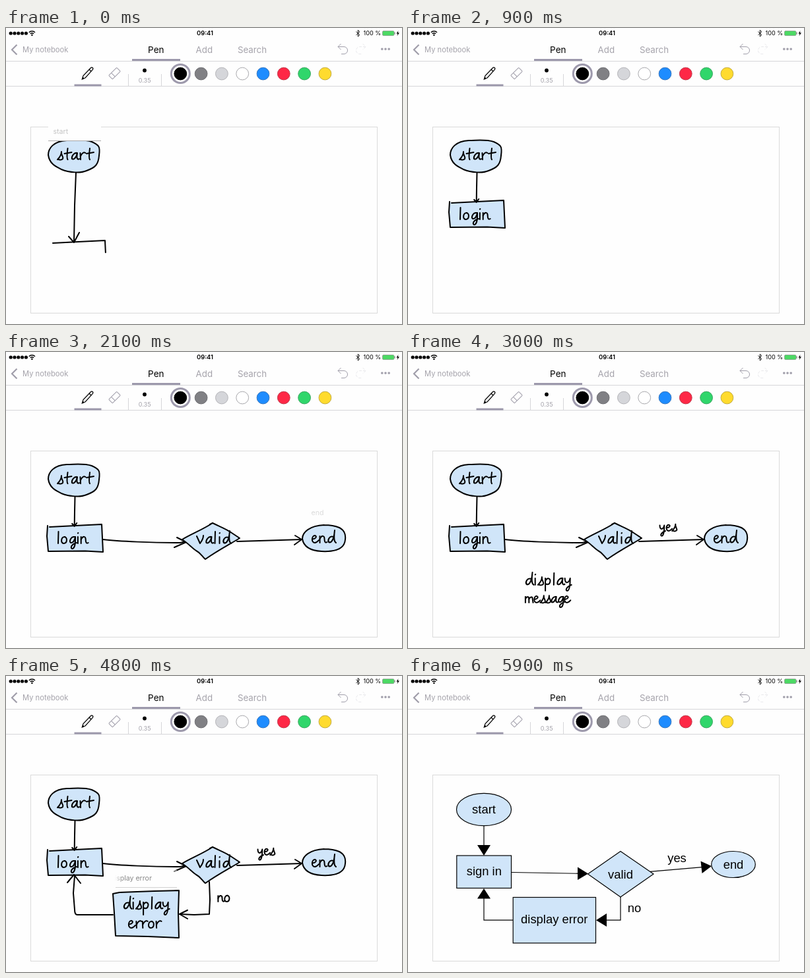
Write an HTML page that moves like this. It is 600x450 px and loops after 6.9 s.

```html
<!DOCTYPE html>
<html lang="en">
<head>
<meta charset="utf-8">
<title>Flowchart sketch</title>
<style>
html, body { margin: 0; width: 100%; height: 100%; overflow: hidden; background: #fefefe; }
svg { display: block; width: 600px; height: 450px; }
.ui { font-family: Inter, Roboto, sans-serif; fill: #a5a3ab; }
.type { font: 18.4px "Liberation Sans", Arial, sans-serif; fill: #000; stroke: none; }
.mid { text-anchor: middle; }
.ink { fill: none; stroke: #000; stroke-width: 2; stroke-linecap: round; stroke-linejoin: round; }
.line { fill: none; stroke: #a09eaa; stroke-width: 1; }
</style>
</head>
<body>
<svg viewBox="0 0 600 450">
  <defs>
    <linearGradient id="edge" gradientUnits="userSpaceOnUse" x1="165" y1="0" x2="176" y2="0">
      <stop stop-color="#000"/><stop offset="1" stop-color="#fff"/>
    </linearGradient>
    <mask id="fade" maskUnits="userSpaceOnUse" x="0" y="0" width="600" height="450">
      <rect width="600" height="450" fill="url(#edge)"/>
    </mask>
  </defs>
  <rect width="600" height="450" fill="#fefefe"/>

  <g class="ui">
    <g id="signal" fill="#000"></g>
    <g fill="none" stroke="#000" stroke-width="1.3">
      <path d="M34.8 6.8a6.2 6.2 0 0 1 9.2 0M36.7 8.9a3.8 3.8 0 0 1 5.4 0"/>
      <path d="M530.5 5.5l5.5 5-2.7 2.5V3.2l2.7 2.5-5.5 5" stroke-width=".9"/>
    </g>
    <circle cx="39.4" cy="10.7" r="1.2" fill="#000"/>
    <text class="mid" x="301.5" y="11.3" font-size="9.4" font-weight="600" fill="#000">09:41</text>
    <text x="541.5" y="11.3" font-size="9.1" fill="#000">100 %</text>
    <rect x="570.5" y="4.5" width="17.5" height="7" rx="1.5" fill="#4cd964" stroke="#8c9a8e" stroke-width=".8"/>
    <path d="M589 6.5v3" stroke="#777" stroke-width="1.2"/>
    <path d="M594.5 4l-3 4.5h2l-.8 3.5 3.3-4.8h-2.2z" fill="#000"/>

    <path class="line" d="M16.5 25.5L9 33l7.5 7.5" stroke-width="2" style="stroke-width:2.2"/>
    <text x="25" y="37" font-size="11.2">My notebook</text>
    <text class="mid" x="227.3" y="38" font-size="13.5" fill="#000">Pen</text>
    <text class="mid" x="300.3" y="38" font-size="13.3">Add</text>
    <text class="mid" x="373" y="38" font-size="13.3">Search</text>
    <path d="M0 50.5H600M0 88.5H600M185.5 70V88M235.5 70V88" stroke="#d6d6d9"/>
    <path d="M191 48.5H264M103.5 87H144.500" stroke="#9d99ac" stroke-width="3"/>
    <path class="line" d="M507.500 24l-4.500 4.500 4.500 4.500M503 28.500h9a5.500 5.500 0 0 1 0 11h-4"/>
    <path class="line" d="M540.500 24l4.500 4.500-4.500 4.500M545 28.500h-9a5.500 5.500 0 0 0 0 11h4" style="stroke:#e9e9ec" stroke-dasharray="4 2"/>
    <g fill="#a09eaa"><circle cx="569.8" cy="32" r="1.8"/><circle cx="575" cy="32" r="1.8"/><circle cx="580.2" cy="32" r="1.8"/></g>

    <path d="M115.300 78l1.700-5.500 11-11.500q2-1.800 3.300-.5t-.3 3.200l-10.800 12zM126 63l3.200 3" fill="none" stroke="#000" stroke-width="1.200"/>
    <path d="M115 78.300l1.300-4 2.500 2.400z" fill="#000"/>
    <g class="line" transform="translate(164.500 69) rotate(-45)">
      <rect x="-8.500" y="-4" width="17" height="8" rx="1"/><path d="M-3 -4v8"/>
    </g>
    <circle cx="210" cy="64.500" r="2.900" fill="#000"/>
    <text class="mid" x="210.200" y="83.300" font-size="9.100">0.35</text>
    <circle cx="264.300" cy="69.500" r="14" fill="#fff" stroke="#9d99ac" stroke-width="3"/>
    <g id="swatches"></g>
  </g>

  <rect x="37.500" y="150.500" width="525" height="283" fill="none" stroke="#dadada"/>
  <g id="hand"></g>
  <g id="labels" class="ui"></g>

  <g id="clean" stroke="#000" stroke-width="1.200">
    <g fill="#d0e5f9">
      <ellipse cx="115" cy="203" rx="41.500" ry="24.600"/>
      <rect x="73.800" y="273" width="82.700" height="49.500"/>
      <path d="M322 266.500L372 301 322 336 272.500 301z"/>
      <ellipse cx="493" cy="286.500" rx="33.300" ry="20"/>
      <rect x="159.200" y="336.500" width="125.300" height="69.500"/>
    </g>
    <path d="M115 228V260M156.500 298.500L260 300.300M367 297.300L448 290.300M322 336V371.200H298M159 371.200H115V335" fill="none"/>
    <path d="M105 257h20l-10 16zM257 290.500v19.500l16-9.500zM443.500 281.500l2 18.500 14.500-11zM301 361v20l-16-9.800zM105 338.500h20l-10-15.500z" stroke="none"/>
    <g class="type mid">
      <text x="115" y="209">start</text><text x="115.300" y="302.500">sign in</text>
      <text x="322" y="308">valid</text><text x="493" y="293">end</text>
      <text x="407.500" y="283">yes</text><text x="343" y="358.500">no</text>
      <text x="221.700" y="376">display error</text>
    </g>
  </g>
</svg>
<script>
const LOOP = 6900, STEP = 100, LAST = 5900, CONVERT = 5700;
const byId = id => document.getElementById(id);
const clamp = v => Math.max(0, Math.min(1, v));
const hand = byId('hand');

function add(parent, tag, attrs) {
  const el = document.createElementNS('http://www.w3.org/2000/svg', tag);
  for (const k in attrs) el.setAttribute(k, attrs[k]);
  return parent.appendChild(el);
}
const show = (el, on) => { el.style.display = on ? '' : 'none'; };

for (let i = 0; i < 5; i++) add(byId('signal'), 'circle', { cx: 7.2 + i * 5.8, cy: 8, r: 2.6 });
[['#000', '#000'], ['#808084', '#707074'], ['#d5d6da', '#b4b4b8'], ['#fff', '#a8a8ac'],
 ['#1e8cff', '#3b78bd'], ['#fe2846', '#c03a4c'], ['#30d66b', '#3ea562'], ['#ffdb2e', '#c2ab42']]
  .forEach(([fill, stroke], i) =>
    add(byId('swatches'), 'circle', { cx: 264.3 + i * 31.3, cy: 69.5, r: 9.4, fill, stroke }));

// Letters as pen strokes on a baseline at 0: [advance, path]
const GLYPHS = {
  a: [11, 'M9 -10C4 -11 0 -5 1 -1C4 1 8 -4 9 -10C8 -4 8 1 12 -1'],
  d: [12, 'M9 -9C3 -11 0 -4 2 -1C6 1 10 -5 11 -19C10 -11 9 -2 13 0'],
  e: [11, 'M1 -6C6 -5 9 -10 5 -11C0 -11 -1 0 5 0C8 0 10 -3 11 -4'],
  g: [11, 'M9 -10C3 -11 0 -2 3 -1C7 0 9 -6 10 -10C10 -2 10 8 5 8C2 7 4 1 12 -1'],
  i: [5, 'M2 -10L2 0M2 -15.5L2.5 -16'],
  l: [5, 'M2 -18L1.5 0'],
  m: [15, 'M1 -10L1 0M1 -6C3 -11 7 -11 7 -6L7 0M7 -6C10 -11 13 -10 13 -6L14 0'],
  n: [12, 'M1 -10L1 0M1 -6C4 -12 8 -11 8 -6C8 -2 9 1 12 -1'],
  o: [11, 'M6 -10C0 -11 -1 0 4 0C10 0 10 -10 5 -10'],
  p: [11, 'M1 -10L1 9M1 -6C4 -12 10 -10 8 -4C7 0 3 0 1 -2'],
  r: [9, 'M1 -10L1.5 0M1.5 -5C3 -9 6 -12 9 -10'],
  s: [9, 'M0 0C4 -4 6 -8 6 -12C5 -6 10 -4 8 -1C6 1 2 1 1 -1'],
  t: [9, 'M5 -17C4 -9 3 -2 5 0M0 -9L11 -11'],
  v: [12, 'M0 -11L5 0C8 -4 10 -8 10 -12'],
  y: [11, 'M0 -10C0 -1 6 -2 8 -10C8 -1 7 8 4 9C0 9 2 3 10 0'],
  ' ': [6, '']
};

const strokes = [], fills = [], labels = [];

// Spreads the time from..to over all pen strokes by their length
function schedule(paths, from, to, until = Infinity) {
  const lens = paths.map(p => p.getTotalLength());
  const rate = (to - from) / lens.reduce((a, b) => a + b, 0);
  let start = from;
  paths.forEach((el, i) => {
    strokes.push({ el, len: lens[i], start, dur: lens[i] * rate, until });
    start += lens[i] * rate;
  });
}
const split = d => d.match(/M[^M]+/g) || [];

function ink(d, from, to, until, parent = hand) {
  schedule(split(d).map(s => add(parent, 'path', { class: 'ink', d: s })), from, to, until);
}
function shape(d, from, to, parent = hand) {
  fills.push({ el: add(parent, 'path', { d, fill: '#d0e5f9' }), at: to });
  ink(d, from, to, Infinity, parent);
}
function write(word, x, y, gap, scale, from, to, until, parent = hand) {
  const paths = [];
  for (const ch of word) {
    const [advance, d] = GLYPHS[ch];
    for (const s of split(d)) {
      const el = add(parent, 'path', { class: 'ink', d: s, transform: `translate(${x} ${y}) scale(${scale})` });
      el.style.strokeWidth = 2 / scale;
      paths.push(el);
    }
    x += advance * scale + gap;
  }
  schedule(paths, from, to, until);
}

shape('M92 171C72 172 64 183 64 193C66 207 76 211 84 215C96 220 113 221 122 217C136 212 140 207 141 194C143 180 141 178 130 173C118 169 105 171 92 171Z', -900, -700);
write('start', 78, 200, 1.5, 1, -600, -400);

const box = add(hand, 'g', {});
shape('M66 266L105 264L145 262L146 283L147 304L120 302.500L64 303L62 280L63 264', -120, 180, box);
write('login', 77.5, 291, .8, 1, 280, 580, 5150, box);
const shaft = add(hand, 'path', { class: 'ink' });

ink('M147 285C170 288 225 290 264 290L272 288M259 282L273 289L255 297', 900, 1050);
shape('M309 262L313 260C325 266 334 269 342 275L354 283C338 293 322 301 302 315C297 311 296 306 288 302C281 297 276 291 267 285C280 277 300 269 313 260', 1050, 1250);
write('valid', 289, 291, 1.5, 1, 1250, 1480);
ink('M350 288L400 286.500L448 285M438 279L448 285L437 293', 1500, 1650);
shape('M482 263C460 264 449 274 449 284C451 297 462 302 478 303C498 304 513 300 514 285C515 277 513 271 505 267C498 264 490 263 482 263', 1650, 1800);
write('end', 463, 290, .5, 1, 1800, 1940);
write('yes', 381.5, 272, 0, .85, 2200, 2450);

shape('M162 331L172 329L225 327L262 326L261 360L262 398L215 396L166 395L164 360L162 331', 3000, 3250);
write('display', 177.5, 354, 1.2, 1, 2450, 2720);
write('message', 177, 381, 0, .9, 2720, 2980, 4200);
ink('M308 313L309 340L308 362L285 363L263 362M275 356L263 362L275 369', 3250, 3450);
write('n', 320.5, 343, 0, .88, 3460, 3580);
write('o', 330.5, 343, 0, .92, 3597, 3680);
ink('M162 363L108 363Q104 363 104 355L102 330L104 304M93 314L103 302L113 315', 3700, 4000);
ink('M176 378L190 371L186 382L204 371L200 382L218 371L214 382L232 371L228 382L248 372', 4020, 4190, 4200);
write('error', 185, 383, .4, 1, 4250, 4560);
ink('M76 288L88 276L86 292L99 277L97 293L110 277L108 292L126 278', 4990, 5140, 5150);
write('sign in', 73, 291, .4, 1.05, 5150, 5480);

function label(text, x, y, left, width, bg, from, to, drift) {
  const back = add(byId('labels'), 'g', { opacity: bg });
  add(back, 'rect', { x: left, y: y - 16, width, height: 26, fill: '#fefefe' });
  add(back, 'path', { d: `M${left} ${y + 10.5}h${width}`, stroke: '#a8a8a8' });
  const holder = add(byId('labels'), 'g', drift ? { mask: 'url(#fade)' } : {});
  const el = add(holder, 'text', { x, y, 'font-size': 10.6, fill: '#888' });
  el.textContent = text;
  labels.push({ back, el, x, from, to, drift });
}
label('start', 71.5, 161, 64, 80, 1, -300, 100, 0);
label('end', 462.5, 248, 460, 30, 0, 1950, 2160, 0);
label('display error', 174, 311, 166, 93, .5, 4600, 5000, 16);

function draw(t) {
  const sketch = t < CONVERT;
  show(hand, sketch);
  show(byId('clean'), !sketch);

  for (const s of strokes) {
    const p = clamp((t - s.start) / s.dur);
    show(s.el, p > 0 && t < s.until);
    s.el.setAttribute('stroke-dasharray', p < 1 ? `${p * s.len} ${s.len + 9}` : 'none');
  }
  for (const f of fills) show(f.el, t >= f.at);

  // The box is dragged up and its connector follows
  const u = clamp((t - 580) / 300), e = u * u * (3 - 2 * u), r = 1 - e;
  box.setAttribute('transform', `translate(${5 * r} ${61 * r})`);
  const tip = 265 + 61 * r, x = 103.7 - .7 * r;
  shaft.setAttribute('d', `M${104.5 + 1.5 * r} 220L104 ${243 + 27 * r}L${x} ${tip}` +
    `M${x - 3.5 - 4.5 * r} ${tip - 4 - 5 * r}L${x} ${tip}L${x + 3.5 + 4.5 * r} ${tip - 5 - 10 * r}`);

  for (const l of labels) {
    const on = t >= l.from && t < l.to;
    show(l.back, on);
    show(l.el, on);
    l.el.setAttribute('opacity', clamp((l.to - t) / 200));
    l.el.setAttribute('x', l.x - l.drift * Math.max(0, t - 4700) / 100);
  }
}

const origin = performance.now();
function tick() {
  const t = (performance.now() - origin) % LOOP;
  draw(Math.min(LAST, Math.floor(t / STEP) * STEP));
  requestAnimationFrame(tick);
}
tick();
</script>
</body>
</html>
```
